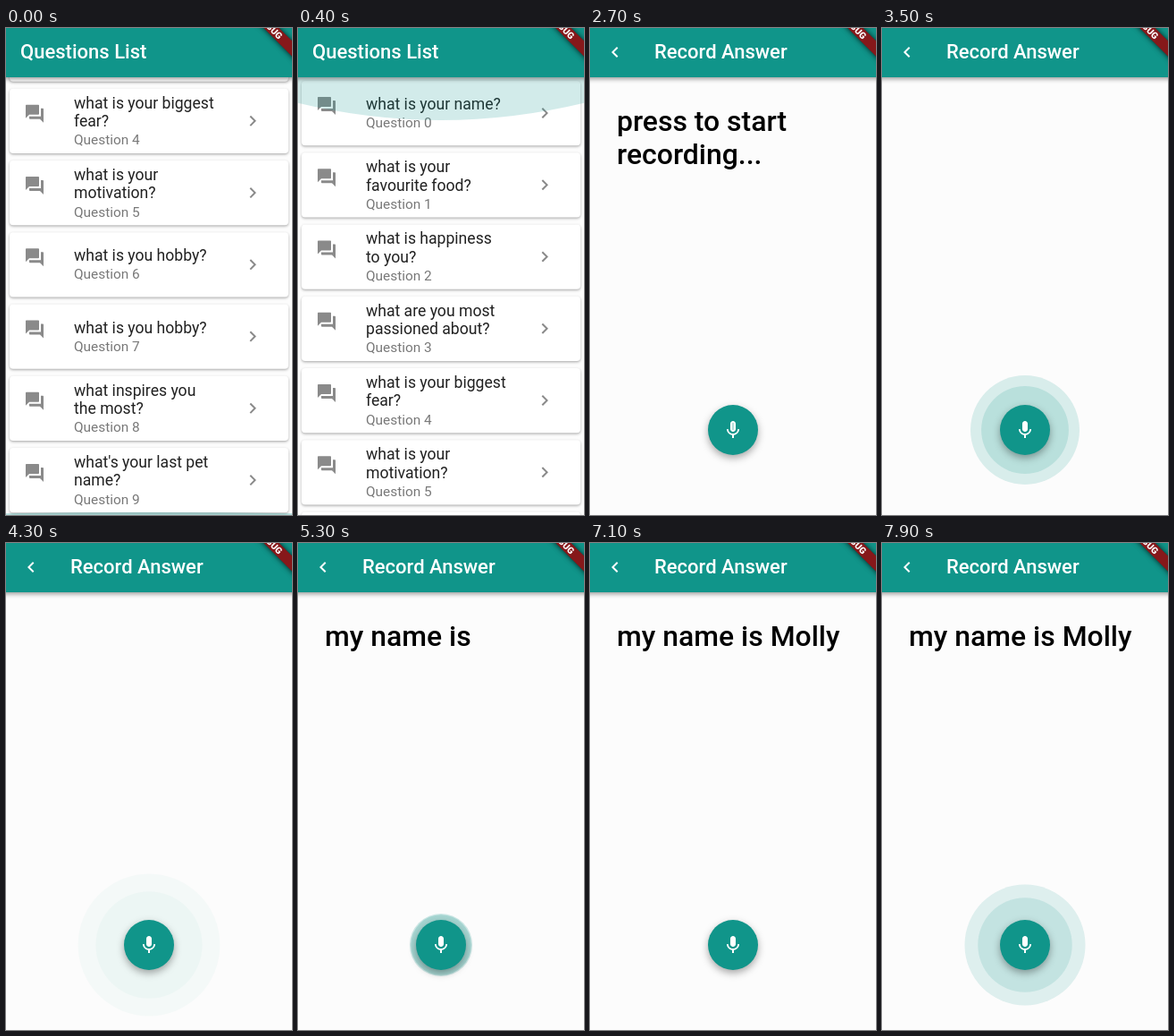
Write an HTML page with a canvas that moves like this. It is 320x544 px and loops after 8000 ms.

```html
<!DOCTYPE html>
<html lang="en">
<head>
<meta charset="utf-8">
<title>Questions List</title>
<style>
html, body { margin: 0; width: 100%; height: 100%; overflow: hidden; background: #fcfcfc; }
canvas { display: block; width: 320px; height: 544px; }
</style>
</head>
<body>
<canvas id="stage"></canvas>
<script>
const W = 320, H = 544, LOOP = 8000, BAR = 55, PITCH = 80.25, MAX_SCROLL = 312.2;
const TEAL = '#10958a', PAPER = '#fcfcfc', FONT = 'Roboto, Arial, sans-serif';
const dpr = window.devicePixelRatio || 1;

const questions = [
  ['what is your name?'],
  ['what is your', 'favourite food?'],
  ['what is happiness', 'to you?'],
  ['what are you most', 'passioned about?'],
  ['what is your biggest', 'fear?'],
  ['what is your', 'motivation?'],
  ['what is you hobby?'],
  ['what is you hobby?'],
  ['what inspires you', 'the most?'],
  ["what's your last pet", 'name?']
];

// What the answer page shows from each moment on
const speech = [
  [0, 'press to start', 'recording...'],
  [2850, ''],
  [4900, 'my'],
  [5100, 'my name'],
  [5300, 'my name is'],
  [5600, 'my name is Molly']
];

const icons = {
  chat: new Path2D('M21 6h-2v9H6v2c0 .55.45 1 1 1h11l4 4V7c0-.55-.45-1-1-1zm-4 6V3c0-.55-.45-1-1-1H3c-.55 0-1 .45-1 1v14l4-4h10c.55 0 1-.45 1-1z'),
  next: new Path2D('M10 6 8.59 7.41 13.17 12l-4.58 4.59L10 18l6-6z'),
  back: new Path2D('M15.41 7.41 14 6l-6 6 6 6 1.41-1.41L10.83 12z'),
  mic: new Path2D('M12 14c1.66 0 2.99-1.34 2.99-3L15 5c0-1.66-1.34-3-3-3S9 3.34 9 5v6c0 1.66 1.34 3 3 3zm5.3-3c0 3-2.54 5.1-5.3 5.1S6.7 14 6.7 11H5c0 3.41 2.72 6.23 6 6.72V21h2v-3.28c3.28-.48 6-3.3 6-6.72h-1.7z')
};

function makeContext(canvas) {
  canvas.width = W * dpr;
  canvas.height = H * dpr;
  const c = canvas.getContext('2d');
  c.scale(dpr, dpr);
  return c;
}
const stage = makeContext(document.getElementById('stage'));
const answer = makeContext(document.createElement('canvas'));

const clamp = v => Math.min(1, Math.max(0, v));
const span = (t, a, b) => clamp((t - a) / (b - a));

// cubic-bezier(.4, 0, .2, 1)
function fastOutSlowIn(x) {
  let lo = 0, hi = 1;
  for (let i = 0; i < 24; i++) {
    const s = (lo + hi) / 2, r = 1 - s;
    if (1.2 * r * r * s + 0.6 * r * s * s + s * s * s < x) lo = s; else hi = s;
  }
  return lo * lo * (3 - 2 * lo);
}

function text(c, str, x, y, size, color, weight = 400) {
  c.font = `${weight} ${size}px ${FONT}`;
  c.fillStyle = color;
  c.fillText(str, x, y);
}

function icon(c, name, x, y, color) {
  c.save();
  c.translate(x, y);
  c.fillStyle = color;
  c.fill(icons[name]);
  c.restore();
}

function shadow(c, alpha, blur, dy) {
  c.shadowColor = `rgba(0,0,0,${alpha})`;
  c.shadowBlur = blur * dpr;
  c.shadowOffsetY = dy * dpr;
}

function disc(c, x, y, r, fill) {
  c.beginPath();
  c.arc(x, y, r, 0, Math.PI * 2);
  c.fillStyle = fill;
  c.fill();
}

function appBar(c, title, x) {
  c.save();
  shadow(c, 0.4, 5, 2);
  c.fillStyle = TEAL;
  c.fillRect(-10, -20, W + 20, BAR + 20);
  c.restore();
  text(c, title, x, 34.3, 22, '#fff', 500);
}

function card(c, lines, index, top) {
  c.save();
  shadow(c, 0.32, 3, 1.2);
  c.fillStyle = '#fff';
  c.beginPath();
  c.roundRect(4, top, W - 8, PITCH - 8, 4);
  c.fill();
  c.restore();
  const first = lines.length > 1 ? 21.8 : 32;
  lines.forEach((line, i) => text(c, line, 76, top + first + i * 20.6, 17.6, '#212121'));
  text(c, 'Question ' + index, 76, top + (lines.length > 1 ? 62.5 : 52), 15.4, '#787878');
  icon(c, 'chat', 20, top + 16, '#8a8a8a');
  icon(c, 'next', 264, top + 24, '#8a8a8a');
}

// Curved tint at a list edge; dir is 1 at the top, -1 at the bottom
function edgeGlow(c, y, depth, alpha, dir) {
  if (depth <= 0 || alpha <= 0) return;
  const side = y + dir * depth * 0.6, mid = y + dir * depth * 1.4;
  c.fillStyle = `rgba(16,150,145,${alpha})`;
  c.beginPath();
  c.moveTo(0, y);
  c.lineTo(0, side);
  c.quadraticCurveTo(W / 2, mid, W, side);
  c.lineTo(W, y);
  c.fill();
}

function listPage(c, t) {
  c.fillStyle = PAPER;
  c.fillRect(0, 0, W, H);
  const k = span(t, 40, 320);
  const scroll = MAX_SCROLL * (1 - k * k * (3 - 2 * k));
  questions.forEach((lines, i) => {
    const top = BAR + 4 + i * PITCH - scroll;
    if (top > -PITCH && top < H) card(c, lines, i, top);
  });
  const pull = span(t, 300, 390) * (1 - fastOutSlowIn(span(t, 410, 1000)));
  edgeGlow(c, BAR, 48 * pull, 0.19 * Math.sqrt(pull), 1);
  const rest = 1 - span(t, 0, 90);
  edgeGlow(c, H, 3 * rest, 0.3 * rest, -1);
  appBar(c, 'Questions List', 16);
}

function pulse(c, t) {
  const since = t - 2522;
  if (since < 0) return;
  const u = clamp((since % 2127) / 2000), p = fastOutSlowIn(u);
  const fill = `rgba(16,149,138,${0.3 * (1 - u)})`;
  disc(c, 160, 449, 80 * p, fill);
  disc(c, 160, 449, 13.3 + 46.7 * p, fill);
}

function answerPage(c, t) {
  c.fillStyle = PAPER;
  c.fillRect(0, 0, W, H);
  const lines = speech.filter(s => t >= s[0]).pop().slice(1);
  lines.forEach((line, i) => text(c, line, 30, 114.8 + i * 37.4, 31.9, '#000', 500));
  pulse(c, t);
  c.save();
  shadow(c, 0.34, 8, 3.5);
  disc(c, 160, 449, 28, TEAL);
  c.restore();
  icon(c, 'mic', 148, 437, '#fff');
  if (t < 2750) {
    c.fillStyle = 'rgba(16,149,138,.3)';
    c.beginPath();
    c.roundRect(158.8, 440.7, 2.4, 8.6, 1.2);
    c.fill();
  }
  appBar(c, 'Record Answer', 72);
  icon(c, 'back', 16, 15, '#fff');
}

function banner(c) {
  c.save();
  c.translate(W, -25);
  c.rotate(Math.PI / 4);
  c.save();
  shadow(c, 0.8, 6, 0);
  c.fillStyle = '#4c1518';
  c.fillRect(-50, 28, 100, 12);
  c.restore();
  c.fillStyle = 'rgba(183,28,28,.55)';
  c.fillRect(-50, 28, 100, 12);
  c.textAlign = 'center';
  text(c, 'DEBUG', 0, 37.6, 10.2, '#fff', 900);
  c.restore();
}

function draw(t) {
  const open = span(t, 1480, 1790);
  if (open < 1) listPage(stage, t);
  if (open > 0) {
    answerPage(answer, t);
    stage.save();
    stage.globalAlpha = open * open * (3 - 2 * open);
    stage.drawImage(answer.canvas, 0, (1 - fastOutSlowIn(open)) * H / 4, W, H);
    stage.restore();
  }
  banner(stage);
}

const start = performance.now();
function tick() {
  draw((performance.now() - start) % LOOP);
  requestAnimationFrame(tick);
}
tick();
</script>
</body>
</html>
```
